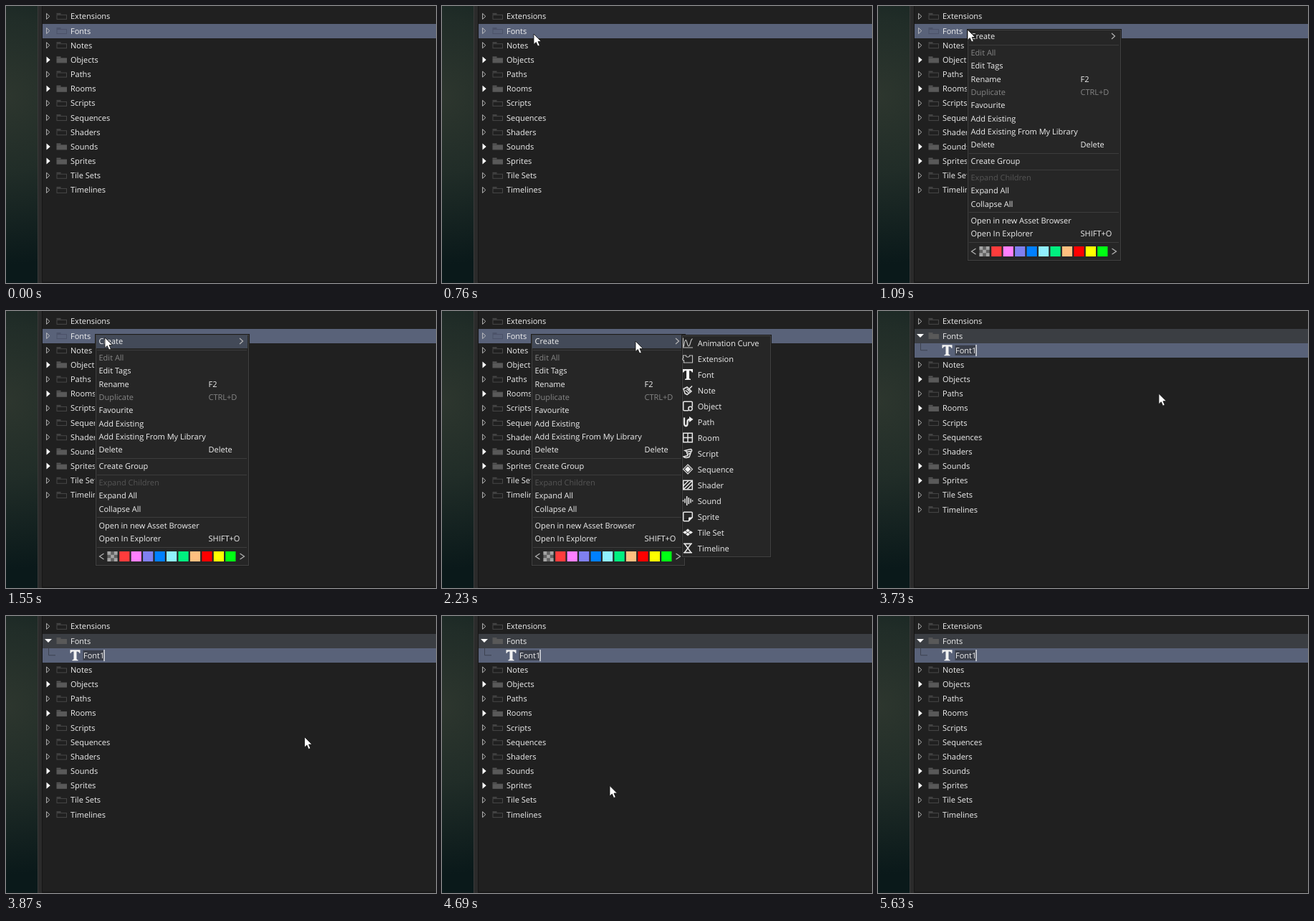
Recreate the animation shown at these times as an HTML page. Size 600 px wide and 386 px high, loop 5700 ms.

```html
<!DOCTYPE html>
<html lang="en">
<head>
<meta charset="utf-8">
<title>Creating a font asset</title>
<style>
html, body { margin: 0; width: 100%; height: 100%; overflow: hidden; background: #202020; }
svg { display: block; width: 100%; height: 100%; }
text { font: 11px "Open Sans", "Noto Sans", sans-serif; text-rendering: geometricPrecision; white-space: pre; }
.icon { fill: none; stroke: #e6e6e6; stroke-width: 1.5; }
.solid { fill: #f2f2f2; stroke: none; }
</style>
</head>
<body>
<svg id="stage" viewBox="0 0 600 386"></svg>
<script>
const LOOP = 5700, TICK = 70;
const ROW = 20.17, MENU_ROW = 18.33, SUB_ROW = 22, SUB_TOP = 34;
const HOVER = '#434a58', SELECTED = '#596279';

const rect = (x, y, w, h, fill, extra = '') =>
  `<rect x="${x}" y="${y}" width="${w}" height="${h}" fill="${fill}" ${extra}/>`;
const path = (d, extra = '') => `<path d="${d}" ${extra}/>`;
const label = (x, middle, s, fill = '#f0f0f0') =>
  `<text x="${x}" y="${middle + 4}" fill="${fill}">${s}</text>`;
const group = (id, content) => `<g id="${id}">${content}</g>`;
const at = (x, y, content) => `<g transform="translate(${x} ${y})">${content}</g>`;
// Floating panel with a light edge inside a dark rim
const panel = (x, y, w, h) => rect(x - 1, y - 1, w + 2, h + 2, '#1c1c1c') +
  rect(x + .5, y + .5, w - 1, h - 1, '#262626', 'stroke="#414141"');

const LETTER_T = path('M-7-7.5H7V-3H5.8Q5.4-5.2 3-5.2H2V5Q2 6.2 4 6.3V7.5H-4V6.3Q-2 6.2-2 5V-5.2H-3Q-5.4-5.2-5.8-3H-7Z', 'class="solid"');

// Asset tree
const FOLDERS = ['Extensions', 'Fonts', 'Notes', 'Objects', 'Paths', 'Rooms', 'Scripts',
  'Sequences', 'Shaders', 'Sounds', 'Sprites', 'Tile Sets', 'Timelines'];
const FILLED = ['Objects', 'Rooms', 'Sounds', 'Sprites'];

function folder(y, full, color) {
  return path(`M70.5 ${y - 4.5}h6v1.8h-6z`, `fill="${color}"`) +
    rect(71, y - 2, 13.5, 6, full ? color : 'none', `stroke="${color}"`);
}

function tree(open) {
  const middle = i => 14.4 + ROW * i;
  const band = (i, fill) => rect(51, Math.round(middle(i) - 10), 549, 20, fill);
  let out = open ? band(1, '#3b3e43') + band(2, SELECTED) : band(1, SELECTED);
  FOLDERS.forEach((name, i) => {
    const y = middle(open && i > 1 ? i + 1 : i);
    const isFont = name === 'Fonts', full = FILLED.includes(name);
    if (isFont && open) out += path(`M54 ${y - 2.5}h10l-5 5z`, 'fill="#fff"');
    else if (full) out += path(`M56.5 ${y - 4.5}v9l5.2-4.5z`, 'fill="#fff"');
    else out += path(`M56.6 ${y - 4}v8l4.2-4z`, 'fill="none" stroke="#c8c8c8" stroke-width=".9"');
    const color = isFont && !open ? '#4b5268' : full || isFont ? '#595959' : '#474747';
    out += folder(y, full || isFont && open, color) + label(90, y, name);
  });
  if (open) {
    const y = middle(2);
    out += path(`M59.5 ${y - 10}V${y}H69`, 'fill="none" stroke="#3d4250"') + at(96.5, y, LETTER_T) +
      rect(107.5, y - 7, 29, 14, '#3a3e49') + label(108, y, 'Font1') +
      rect(136.4, 47, 1.2, 16, '#fff', 'id="caret"');
  }
  return out;
}

// Context menu: '-' separates sections
const MENU = [['Create'], '-', ['Edit All', '', '#858585'], ['Edit Tags'], ['Rename', 'F2'],
  ['Duplicate', 'CTRL+D', '#858585'], ['Favourite'], ['Add Existing'], ['Add Existing From My Library'],
  ['Delete', 'Delete'], '-', ['Create Group'], '-', ['Expand Children', '', '#555'], ['Expand All'],
  ['Collapse All'], '-', ['Open in new Asset Browser'], ['Open In Explorer', 'SHIFT+O'], '-'];
const SWATCHES = ['#ff3c3c', '#ff80ff', '#8080f0', '#0080ff', '#90f0ff', '#00f080',
  '#ffc080', '#ff0000', '#ffff00', '#00ff14'];

function menu() {
  let out = panel(125, 33, 214, 322) + rect(126, 33.5, 211, 18.5, HOVER, 'id="createHover"');
  let y = 42;
  for (const item of MENU) {
    if (item === '-') {
      out += rect(127, Math.round(y - 6.8), 209, 1, '#3c3c3c');
      y += 4.6;
      continue;
    }
    const [name, keys = '', color] = item;
    out += label(129.5, y, name, color) + label(282.5, y, keys, color);
    y += MENU_ROW;
  }
  const chevron = 'fill="none" stroke="#b4b4b4" stroke-width="1.2"';
  out += path('M326 38l4.5 4-4.5 4', chevron) + path('M136.5 338l-6 4 6 4', chevron) +
    path('M326.5 338l6 4-6 4', chevron);
  out += rect(141.5, 335, 14, 14, '#626262') +
    path('M141.500 335h4.700v4.700h-4.700zM150.800 335h4.700v4.700h-4.700zM146.200 339.700h4.600v4.600h-4.600zM141.500 344.300h4.700v4.700h-4.700zM150.800 344.300h4.700v4.700h-4.700z'.replace(/00\b/g, ''), 'fill="#a4a4a4"');
  SWATCHES.forEach((color, i) => out += rect(158.2 + 16.45 * i, 335, 14.2, 14, color));
  return out;
}

// Submenu entries with their icons, drawn around the icon centre
const thin = d => path(d, 'stroke-width="1.1" stroke="#c4c4c4"');
const solid = d => path(d, 'class="solid"');
const FRAME = 'M6.3 1V-5Q6.3-6.3 5-6.3H-5Q-6.3-6.3-6.3-5V5Q-6.3 6.3-5 6.3H1';
const ASSETS = [
  ['Animation Curve', thin('M-6.5-7V6.5H7M-5.5 5C-4-6-2.5-6-1 0S2 6 3.5 0 5-4 6.5-6')],
  ['Extension', thin('M-6.5-4.5H-2.5C-3-1.5 3-1.5 2.5-4.5H6.5V5.5H-5.5V2C-8 2.5-8-1.5-5.5-1H-6.5Z')],
  ['Font', LETTER_T],
  ['Note', path('M-6-2L-1-4.500 5 1.500-1 6-4 4.500ZM-3.500 0L1 3.500M-1.500-2L3 2M1-1L6-6')],
  ['Object', path(FRAME) + '<circle cx="3.5" cy="3.5" r="2.7"/>'],
  ['Path', path('M-5-6V2C-5 7-.5 7-.5 2V0C-.5-3 1-3.5 3-3.5', 'stroke-width="2.3"') + solid('M2-7.5L7.5-3.5 2 .5Z')],
  ['Room', path('M-6.3-6.3H6.3V6.3H-6.3ZM0-6V6M-6 0H6')],
  ['Script', path('M-4-4L4-6Q7-5 4.5-2L2 5Q-4 7-6 4.5L0 3-2-3ZM-1-2L4-3M0 1L3 0')],
  ['Sequence', path('M0-6.5L6.5 0 0 6.5-6.5 0Z', 'stroke-width="1.1"') + solid('M0-4.2L4.2 0 0 4.2-4.2 0Z')],
  ['Shader', path('M-6.3-6.3H6.3V6.3H-6.3ZM-6 1L1-6M-6 6L6-6M-1 6L6-1')],
  ['Sound', path('M-6.5-1V1M-4-3V3M-1.3-6.5V6.5M1.3-4.5V4.5M4-3V3M6.5-1V1')],
  ['Sprite', path(FRAME + 'Z') + solid('M1 7V2Q1 1 2 1H7Z')],
  ['Tile Set', solid('M0-5L3-2.6 0-.3-3-2.6ZM0 .3L3 2.6 0 5-3 2.6ZM-3.8-2.3L-.7 0-3.8 2.3-7 0ZM3.8-2.3L7 0 3.8 2.3 .7 0Z')],
  ['Timeline', path('M-6-6.3H6M-6 6.3H6M-4.5-6L4.5 6H-4.5L4.5-6Z')],
];

function submenu() {
  let out = panel(335, 34, 124, 309) + rect(352, 0, 105.5, SUB_ROW, HOVER, 'id="subHover"');
  ASSETS.forEach(([name, icon], i) => {
    const y = SUB_TOP + SUB_ROW * i + 10.5;
    out += at(343, y, `<g class="icon">${icon}</g>`) + label(356.8, y, name);
  });
  return out;
}

const stage = document.getElementById('stage');
stage.innerHTML =
  `<defs><radialGradient id="glow" gradientUnits="userSpaceOnUse" cx="0" cy="125" r="235">
    <stop offset="0" stop-color="#2d362e"/><stop offset=".45" stop-color="#212d28"/>
    <stop offset="1" stop-color="#0a191a"/></radialGradient></defs>` +
  rect(0, 0, 600, 386, '#202020') + rect(0, 0, 44, 386, 'url(#glow)') +
  rect(44, 0, 6, 386, '#2b2b2b') + rect(44, 0, 1, 386, '#3a3a3a') + rect(50, 0, 1, 386, '#151515') +
  group('closedTree', tree(false)) + group('openTree', tree(true)) +
  rect(50, 384, 550, 2, '#181818') +
  group('menu', menu()) + group('submenu', submenu()) +
  group('cursor',
    group('ring', '<circle r="10" fill="none" stroke="#000"/><circle r="9" fill="none" stroke="#fff"/>') +
    path('M0 0V14.5L3.3 11.5 5.7 17 8.3 15.9 6 10.5H10.5Z', 'fill="#fff" stroke="#111" stroke-width=".8"'));

const part = Object.fromEntries([...stage.querySelectorAll('[id]')].map(e => [e.id, e]));
const show = (id, on) => part[id].setAttribute('visibility', on ? 'inherit' : 'hidden');
const within = (t, from, to) => t >= from && t < to;

// Pointer moves: start time, number of ticks, destination, easing
const linear = p => p, smooth = p => p * p * (3 - 2 * p), easeOut = p => p * (2 - p);
const MOVES = [
  [270, 8, 128, 39, smooth],
  [830, 1, 125, 33, linear],
  [1410, 3, 138, 37, linear],
  [2020, 4, 270, 42, smooth],
  [2300, 5, 384, 104, easeOut],
  [2660, 4, 379.5, 88.5, smooth],
  [3730, 3, 416.5, 168.5, linear],
  [3940, 4, 426, 190, easeOut],
  [4480, 8, 42, 283, smooth],
];

function pointer(t) {
  let x = 144, y = 295;
  for (const [start, ticks, toX, toY, ease] of MOVES) {
    if (t < start) break;
    const p = ease(Math.min(1, (Math.floor((t - start) / TICK) + 1) / ticks));
    x += (toX - x) * p;
    y += (toY - y) * p;
  }
  return [x, y];
}

function render(t) {
  const [x, y] = pointer(t);
  const created = t >= 3730, subOpen = within(t, 1750, 3730);
  show('closedTree', !created);
  show('openTree', created);
  show('caret', created && !within(t, 4150, 4690) && !within(t, 5170, 5630));
  show('menu', within(t, 1090, 3730));
  show('createHover', within(t, 1410, 3730));
  show('submenu', subOpen);
  show('subHover', subOpen && x > 340);
  part.subHover.setAttribute('y', SUB_TOP + SUB_ROW * Math.floor((y - SUB_TOP) / SUB_ROW));
  show('cursor', within(t, 200, 5040));
  show('ring', within(t, 830, 900) || within(t, 3460, 3530));
  part.cursor.setAttribute('transform', `translate(${x} ${y})`);
}

function frame() {
  render(performance.now() % LOOP);
  requestAnimationFrame(frame);
}
frame();
</script>
</body>
</html>
```
